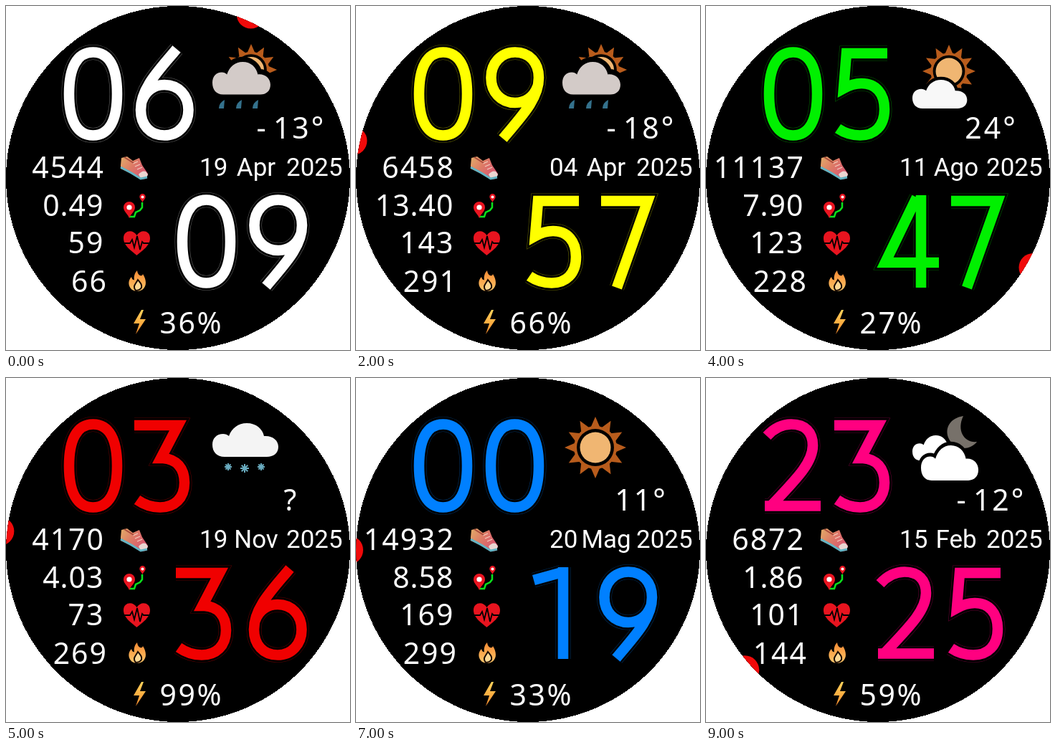
Write an HTML page that moves like this. It is 480 px wide and 480 px high and loops after 10000 ms.

```html
<!DOCTYPE html>
<html lang="en">
<head>
<meta charset="utf-8">
<title>Watch face</title>
<style>
  html, body { margin: 0; width: 100%; height: 100%; overflow: hidden; background: #fff; }
  svg { display: block; width: 100vw; height: 100vh; }
  .num { font: 41px "Noto Sans", "Open Sans", sans-serif; letter-spacing: 2px; fill: #fff; }
  .date { font: 35px Roboto, sans-serif; fill: #fff; }
  .end { text-anchor: end; }
  .mid { text-anchor: middle; }
  #temp { letter-spacing: 3px; }
  #dist { letter-spacing: 1px; }
  #power { letter-spacing: 2.5px; }
  .big path { fill: none; stroke-width: 14.6; }
  .big .rim { stroke-width: 21; opacity: .35; }
  .big .gap { stroke: #000; stroke-width: 19.8; }
</style>
</head>
<body>
<svg viewBox="0 0 480 480">
  <defs>
    <clipPath id="face"><circle cx="240" cy="240" r="240"/></clipPath>
    <linearGradient id="fire" x2="0" y2="1">
      <stop offset="0" stop-color="#f58a32"/><stop offset="1" stop-color="#ffc66a"/>
    </linearGradient>
    <linearGradient id="volt" x2="0" y2="1">
      <stop offset="0" stop-color="#ffd45c"/><stop offset="1" stop-color="#f78a2a"/>
    </linearGradient>
    <linearGradient id="shoe" x2="1" y2=".6">
      <stop offset="0" stop-color="#e3ad68"/><stop offset=".5" stop-color="#dd7a66"/><stop offset="1" stop-color="#d85672"/>
    </linearGradient>
    <path id="cloud" d="M17 47C6 47 0 40 0 30C0 21 6 15 15 15C18 15 21 16 23 18C27 7 36 0 48 0C61 0 70 8 72 18C84 17 92 24 92 33C92 42 85 47 76 47Z"/>
    <path id="pin" d="M0 0C-2-6-8-9-8-15A8 8 0 0 1 8-15C8-9 2-6 0 0Z"/>
  </defs>
  <circle cx="240" cy="240" r="240" shape-rendering="crispEdges"/>
  <circle id="sec" r="20" fill="#f00a0a" clip-path="url(#face)"/>
  <g id="digits" class="big"></g>
  <g id="sky"></g>

  <g id="shoeIcon">
    <path d="M160 222L161 212L169 210L177 216L186 212L190 222L198 234L196 241L188 242L175 234L160 227Z" fill="url(#shoe)"/>
    <path d="M185 235Q190 229 195 231L198 235L196 240L188 241Z" fill="#ead6d2"/>
    <path d="M160 225L175 233L188 241L197 239" fill="none" stroke="#62b4c4" stroke-width="3"/>
    <path d="M177 220l7-3M180 224l7-3M183 228l7-3" stroke="#f4cfc0" stroke-width="1.2"/>
    <path d="M165 211L178 219" stroke="#a84c3c" stroke-width="2"/>
  </g>
  <g id="routeIcon">
    <path d="M172 294H179L181 288L187 285L190 281V274" fill="none" stroke="#0be21c" stroke-width="2.5"/>
    <use href="#pin" x="172" y="296" fill="#ea1420"/><circle cx="172" cy="281" r="3.6" fill="#fff"/>
    <use href="#pin" transform="translate(190.5 274)scale(.52)" fill="#ea1420"/><circle cx="190.5" cy="266.5" r="2" fill="#fff"/>
  </g>
  <g id="heartIcon">
    <path d="M182.5 348C176 342 164 335 164 324C164 313 177 311 182.5 320C188 311 201 313 201 324C201 335 189 342 182.5 348Z" fill="#e8141f"/>
    <path d="M164 331H173L176 326L179 337L183 321L187 340L190 329L192 331H201" fill="none" stroke="#000" stroke-width="1.8"/>
  </g>
  <g id="flameIcon">
    <path d="M183 369C184 377 190 378 191 374C196 382 197 391 190 396Q183 400 176 396C170 391 170 383 175 378C176 382 178 383 179 382C178 377 180 372 183 369Z" fill="url(#fire)"/>
    <path d="M181 397C176 391 181 388 184 382C188 387 190 389 189 393C187 396 185 397 181 397Z" fill="#ffd894" stroke="#180a02" stroke-width="2"/>
  </g>
  <path d="M189 424L178 443H186L181 458L195 437H187L192 424Z" fill="url(#volt)"/>

  <text id="temp" class="num mid" x="398" y="185"/>
  <text id="steps" class="num end" x="138" y="240"/>
  <text id="dist" class="num end" x="136.5" y="293"/>
  <text id="pulse" class="num end" x="137.5" y="345"/>
  <text id="kcal" class="num end" x="142" y="399"/>
  <text id="power" class="num" x="214.500" y="457"/>
  <text id="day" class="date" x="270" y="237"/>
  <text id="month" class="date mid" x="349" y="237"/>
  <text id="year" class="date" x="391" y="237"/>
</svg>
<script>
const $ = id => document.getElementById(id);

// Centre lines of the large digits in an 85 x 133 cell
const GLYPHS = [
  "M42.5 8.5C65 8.5 76 30 76 66.5S65 124.5 42.5 124.5S9 103 9 66.5S20 8.5 42.5 8.5Z",
  "M52 130V2M11 20L49 9.5",
  "M6 25C16 14 26 8.5 40 8.5C60 8.5 70 20 70 38C70 62 48 84 13 121M3 122.5H81",
  "M0 10H61L37 56H40C59 57 70 70 70 90C70 112 56 124.5 36 124.5C24 124.5 14 121 4 114",
  "M88 96H13L57 5M63 131V2",
  "M74 10H17L13 59C22 54 30 52 38 52C58 52 70 66 70 88C70 112 56 124.5 36 124.5C24 124.5 14 121 5 115",
  "M59 4C36 32 9 58 9 89C9 110 22 124.5 42 124.5S75.5 109 75.5 89S62 54 42 54C28 54 16 62 11 76",
  "M5 10H70L27 131",
  "M42 60C25 55 15 47 15 34C15 18 27 8.5 42 8.5S69 18 69 34C69 47 59 55 42 60C20 66 9 76 9 92C9 113 23 124.5 42 124.5S75 113 75 92C75 76 64 66 42 60Z",
  "M26 129C49 101 76 75 76 44C76 23 63 8.5 43 8.5S9.5 24 9.5 44S23 79 43 79C57 79 69 71 74 57"
];

const CELLS = [[79, 56], [179, 56], [237, 262], [337, 262]];

function bigDigits(time, color) {
  return [...time].map((c, i) => {
    const d = GLYPHS[c];
    return `<g transform="translate(${CELLS[i]})"><path class="rim" stroke="${color}" d="${d}"/>` +
      `<path class="gap" d="${d}"/><path stroke="${color}" d="${d}"/></g>`;
  }).join("");
}

function sun(x, y, scale) {
  let rays = "";
  for (let a = 0; a < 360; a += 30)
    rays += `<path d="M-6.500-28L0-43L6.500-28Z" transform="rotate(${a})"/>`;
  return `<g transform="translate(${x} ${y})scale(${scale})" fill="#b85c1c">${rays}` +
    `<circle r="30"/><circle r="26" fill="#000"/><circle r="21.5" fill="#f0b672"/></g>`;
}

const cloud = (x, y, sx, sy, fill, gap = 10) =>
  `<use href="#cloud" transform="translate(${x} ${y})scale(${sx} ${sy})" fill="${fill}" stroke="#000" stroke-width="${gap}" paint-order="stroke"/>`;

const drop = x =>
  `<path d="M${x + 4} 131L${x + 3} 143H${x - 4}Q${x - 4} 135 ${x + 4} 131Z" fill="#34718c"/>`;

const flake = (x, y, r) => [0, 45, 90, 135].map(a =>
  `<path d="M${-r} 0H${r}" transform="translate(${x} ${y})rotate(${a})" stroke="#6aacc0" stroke-width="2"/>`).join("");

const SKY = {
  sun: sun(334, 97, 1),
  fair: sun(339, 91, .86) + cloud(288, 103, .83, .85, "#f8f8f8"),
  rain: sun(342, 89, .84) + cloud(288, 78, .88, .97, "#d3cbc8", 15) + [301, 325, 348].map(drop).join(""),
  snow: cloud(288, 63, 1, 1, "#f4f4f4") + flake(310, 124, 5) + flake(333, 126, 6) + flake(356, 124, 5),
  night: `<path d="M359 53C341 56 333 69 338 83C344 99 366 104 378 89C361 91 349 74 359 53Z" fill="#77716a"/>` +
    cloud(288, 80, .68, .75, "#fff") + cloud(300, 94, .87, 1.04, "#fff")
};

const FIELDS = ["temp", "day", "month", "year", "steps", "dist", "pulse", "kcal", "power"];

// time, second, colour, sky, then the text fields
const SCENES = `
0609 4 #fff rain -13° 19 Apr 2025 4544 0.49 59 66 36%
1543 45 #808080 sun -2° 27 Feb 2025 8719 1.19 179 119 88%
0957 47 #ff0 rain -18° 04 Apr 2025 6458 13.40 143 291 66%
1032 12 #ff8000 fair 17° 23 Giu 2025 9265 5.72 95 173 74%
0547 20 #00f000 fair 24° 11 Ago 2025 11137 7.90 123 228 27%
0336 46 #f00000 snow ? 19 Nov 2025 4170 4.03 73 269 99%
1425 31 #0ff sun 19° 06 Set 2025 7386 6.24 112 154 52%
0019 45 #0080ff sun 11° 20 Mag 2025 14932 8.58 169 299 33%
2153 8 #8000ff night -5° 12 Gen 2025 5821 3.17 84 207 45%
2325 38 #ff0080 night -12° 15 Feb 2025 6872 1.86 101 144 59%
`.trim().split("\n").map(line => line.split(" "));

let shown = -1;

function draw(ms) {
  const index = Math.floor(ms / 1000) % SCENES.length;
  if (index === shown) return;
  shown = index;
  const [time, second, color, sky, ...texts] = SCENES[index];
  const angle = second * Math.PI / 30;
  $("sec").setAttribute("cx", 240 + 250 * Math.sin(angle));
  $("sec").setAttribute("cy", 240 - 250 * Math.cos(angle));
  $("digits").innerHTML = bigDigits(time, color);
  $("sky").innerHTML = SKY[sky];
  // a hair space sets the minus sign apart
  FIELDS.forEach((id, i) => $(id).textContent = texts[i].replace("-", "-\u200a"));
}

const start = performance.now();
function tick() {
  draw(performance.now() - start);
  requestAnimationFrame(tick);
}
tick();
</script>
</body>
</html>
```
